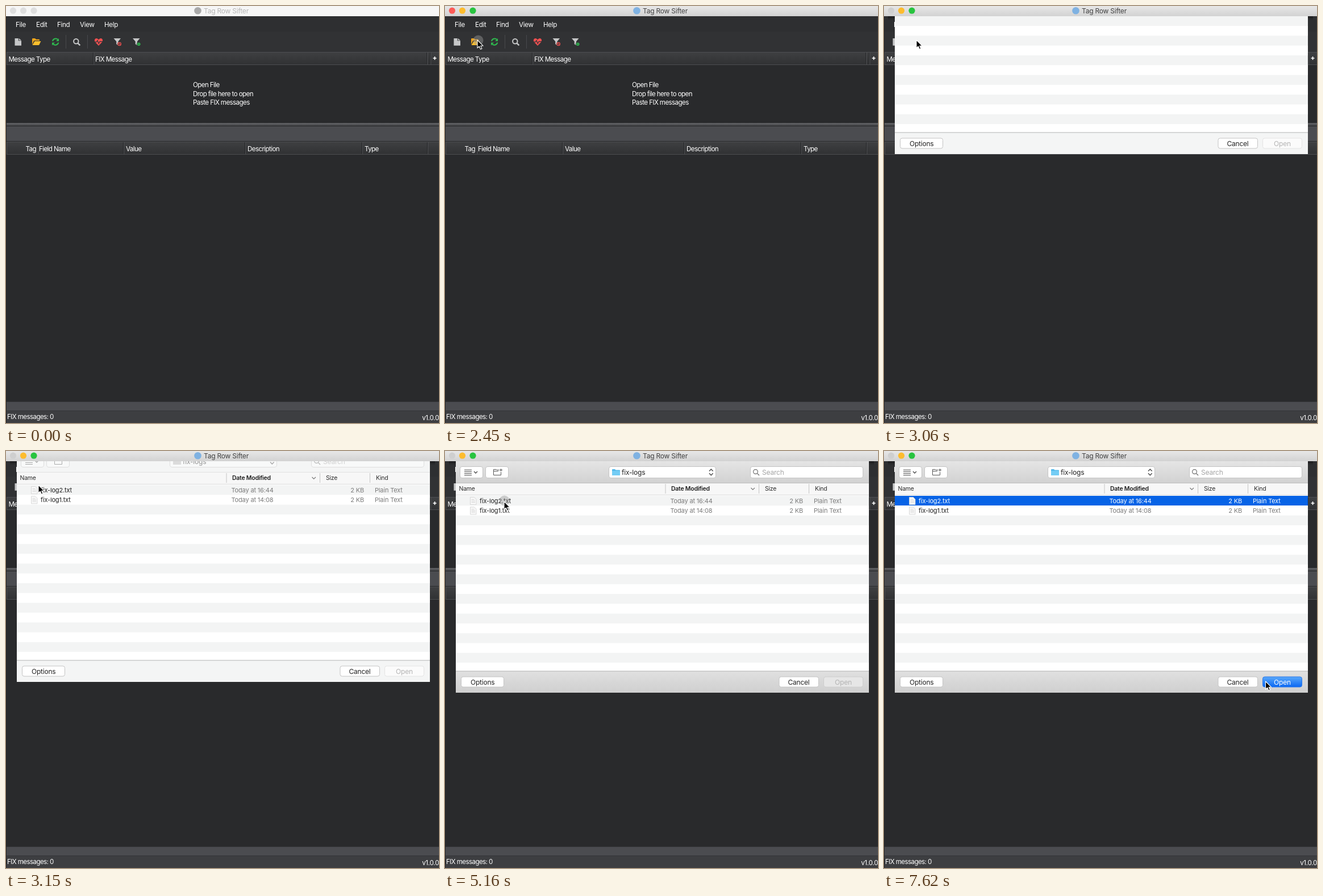
These frames come from a looping animation (762 by 735 pixels, 8 s). An HTML page:

```html
<!DOCTYPE html>
<html lang="en">
<head>
<meta charset="utf-8">
<title>Log window</title>
<style>
html, body { margin: 0; width: 100%; height: 100%; overflow: hidden; background: #292a2c; }
svg { display: block; width: 762px; height: 735px; }
text { font-family: Inter, Roboto, sans-serif; white-space: pre; }
.app { font-size: 11.6px; letter-spacing: -.6px; fill: #fff; }
.menu { font-size: 11.6px; letter-spacing: -.3px; fill: #fff; }
.title { font-size: 12px; letter-spacing: -.22px; }
.ui { font-size: 12px; letter-spacing: -.2px; fill: #222; }
.cell { font-size: 11px; letter-spacing: -.16px; }
.head { font-size: 10.5px; letter-spacing: -.25px; fill: #2b2b2b; }
.bold { font-weight: 600; fill: #1c1c1c; }
.end { text-anchor: end; }
.mid { text-anchor: middle; }
</style>
</head>
<body>
<svg id="stage" viewBox="0 0 762 735" xmlns="http://www.w3.org/2000/svg"></svg>
<script>
const LOOP = 8000;
const stage = document.getElementById('stage');

const rect = (x, y, w, h, fill, more = '') =>
  `<rect x="${x}" y="${y}" width="${w}" height="${h}" fill="${fill}" ${more}/>`;
const text = (x, y, s, cls, more = '') => `<text x="${x}" y="${y}" class="${cls}" ${more}>${s}</text>`;
const path = (d, fill, more = '') => `<path d="${d}" fill="${fill}" ${more}/>`;
const line = (d, color, w = 1, more = '') =>
  path(d, 'none', `stroke="${color}" stroke-width="${w}" ${more}`);
const dot = (x, y, r, fill, more = '') => `<circle cx="${x}" cy="${y}" r="${r}" fill="${fill}" ${more}/>`;
const group = (id, body, more = '') => `<g id="${id}" ${more}>${body}</g>`;
const grad = (id, a, b) => `<linearGradient id="${id}" x2="0" y2="1">
  <stop stop-color="${a}"/><stop offset="1" stop-color="${b}"/></linearGradient>`;

const defs = `<defs>
  ${grad('gTitle', '#e7e7e7', '#d2d2d2')}
  ${grad('gHead', '#3f4042', '#303133')}
  ${grad('gTop', '#e5e5e5', '#d1d1d1')}
  ${grad('gFoot', '#e0e0e0', '#cfcfcf')}
  ${grad('gBlue', '#5aa9fb', '#0a67f3')}
  ${grad('gSplit', '#66676a', '#47484b')}
  ${grad('gShade', '#000', 'rgba(0,0,0,0)')}
  <clipPath id="below">${rect(0, 18, 762, 717, '#000')}</clipPath>
</defs>`;

function tableHead(y, seps) {
  return rect(1, y, 761, 23, 'url(#gHead)') +
    line(`M1 ${y + .5}H762M1 ${y + 22.5}H762M1.5 ${y}V${y + 23}`, '#4d4e51') +
    seps.map(x => line(`M${x - .5} ${y + 1}V${y + 22}`, '#222325') +
      line(`M${x + .5} ${y + 1}V${y + 22}`, '#515255')).join('');
}

function toolbar() {
  const gray = '#c6c7c8', red = '#f05050', green = '#2fbb4f';
  const funnel = x => path(`M${x} 57h12.5l-4.6 5.4v7l-3.2-2.4v-4.6z`, gray);
  return path('M15.5 57h6.3v4.2H27V69.8H15.5z', gray) + path('M22.8 57l4.2 3.4h-4.2z', gray) +
    path('M46 68V58.2q0-1.2 1.2-1.2h4l1.6 1.7h5q1.2 0 1.2 1.2v1.1H50.4q-1.2 0-1.8 1.2z', '#f0a51c') +
    path('M50.6 62H61.4l-2.8 6q-.4.9-1.4.9H46.4z', '#fdbf2d') +
    line('M82 62a5.4 5.2 0 0 1 9.4-2.6M92.2 64.4a5.4 5.2 0 0 1-9.4 2.6', green, 2) +
    path('M93 57v5h-5zM81 69.6v-5h5z', green) +
    line('M105.5 51V75M143.5 51V75', '#48494c') +
    dot(123.3, 62.3, 4.2, 'none', `stroke="${gray}" stroke-width="2"`) +
    line('M126.5 65.6L130.3 69.4', gray, 2.4) +
    path('M163 70L157 63.8C154 60 157.5 55.3 161.300 57.700L163 59.200L164.700 57.700C168.500 55.300 172 60 169 63.800Z', red) +
    line('M155.500 63.300H159.500L161 60.700L163.200 66.200L165 62.700H170.500', '#33363a', 1.2) +
    funnel(189.5) + dot(199.700, 67, 3.600, '#303133') +
    dot(199.700, 67, 2.700, 'none', `stroke="${red}" stroke-width="1.2"`) + line('M198 65.300L201.400 68.700', red, 1.1) +
    funnel(223) + dot(233.700, 67.200, 3.600, '#303133') + dot(233.700, 67.200, 2.800, green) +
    dot(233.700, 67.200, .9, '#303133');
}

function appWindow() {
  const menus = [[17, 'File'], [53, 'Edit'], [90, 'Find'], [130, 'View'], [173, 'Help']];
  const cols = [[58, 'Field Name'], [211, 'Value'], [425, 'Description'], [631, 'Type']];
  const hints = ['Open File', 'Drop file here to open', 'Paste FIX messages'];
  return rect(0, 0, 762, 735, '#292a2c') +
    rect(0, 18, 762, 27, '#2e2f31') + rect(0, 45, 762, 36, '#313234') +
    menus.map(([x, s]) => text(x, 36.5, s, 'menu')).join('') + toolbar() +
    tableHead(81, [154, 741, 747]) +
    text(4.5, 97.5, 'Message Type', 'app') + text(157, 97.5, 'FIX Message', 'app') +
    line('M751.500 92H757.500M754.500 89V95', '#fff', 1.6) +
    hints.map((s, i) => text(329, 143 + i * 15.5, s, 'app')).join('') +
    rect(0, 205, 762, 6, 'url(#gSplit)') + line('M0 205.500H762M0 211.500H762', '#212224') +
    rect(1, 212, 761, 26, '#4b4c50') + line('M0 238.500H762', '#242527') +
    tableHead(239, [56, 207, 421, 627, 742]) +
    text(53, 255.500, 'Tag', 'app end') +
    cols.map(([x, s]) => text(x, 255.500, s, 'app')).join('') +
    rect(0, 697, 762, 16, '#4b4c50') + line('M0 697.500H762M0 713.500H762', '#333437') +
    rect(0, 714, 762, 21, '#3d3e41') +
    text(2, 728, 'FIX messages: 0', 'app') +
    text(762, 729.500, 'v1.0.0', 'menu end') +
    line('M.5 18V735', '#202123');
}

function titleBar() {
  return rect(0, 0, 762, 18, '#f6f6f6', 'id="bar"') +
    [12.5, 30.5, 49].map((x, i) => dot(x, 8.2, 5.600, '#dedede', `id="light${i}"`)).join('') +
    dot(337.5, 8.300, 6.300, '#a9a9a9', 'id="mark"') +
    text(348, 12.800, 'Tag Row Sifter', 'title', 'id="name"');
}

const button = (x, y, w, h, more = '') =>
  rect(x + .5, y + .5, w - 1, h - 1, '#fff', `rx="3.500" stroke="#c4c4c4" ${more}`);

function fileRow(i, name, time) {
  const y = 92 + i * 17.3, top = y - 10.5;
  return path(`M44.500 ${top}h7l3.500 3.500v9.500h-10.500z`, '#f7f7f7', 'stroke="#d2d2d2" stroke-width=".8"') +
    line(`M46.500 ${top + 4}h5M46.500 ${top + 6.500}h6.500M46.500 ${top + 9}h6.500`, '#cfcfcf', .8) +
    `<g id="row${i}">` + text(61, y, name, 'cell', 'fill="#222"') + text(396.500, y, time, 'cell') +
    text(630, y, '2 KB', 'cell end') + text(649, y, 'Plain Text', 'cell') + '</g>';
}

function controls() {
  return button(26, 27, 41, 21) + button(71, 27, 41, 21) + button(288, 27, 189, 21) + button(537, 27, 199, 21) +
    line('M34 33.500H47M34 36.500H47M34 39.500H47M34 42.500H47', '#4a4a4a') +
    line('M51 36L54 39L57 36', '#4a4a4a', 1.300) +
    line('M95 33.500H91.500L90 32.500H85.500V42.500H98.500V37M85.500 35.500H94M98.500 31V36M96 33.500H101', '#555') +
    path('M294 33q0-1 1-1h4l1.500 1.500h6.500q1 0 1 1V42q0 1-1 1H295q-1 0-1-1z', '#54b9ea') +
    rect(294, 35, 14, 8, '#74cdf5', 'rx="1"') +
    text(311, 41.700, 'fix-logs', 'ui') +
    group('arrows', line('M465 35.500L468.300 32L471.600 35.500M465 39.300L468.300 42.800L471.600 39.300', '#4a4a4a', 1.400)) +
    group('arrow', line('M465 38.500L468.300 42L471.600 38.500', '#4a4a4a', 1.400)) +
    dot(546.500, 36.500, 3.900, 'none', 'stroke="#6d6d6d" stroke-width="1.200"') +
    line('M549.400 39.400L553 43', '#6d6d6d', 1.300) +
    text(558, 41.700, 'Search', 'ui', 'style="fill:#a5a5a5"');
}

function sheet() {
  let stripes = '';
  for (let i = 0; i < 18; i += 2) stripes += rect(19, (79 + i * 17.3).toFixed(1), 727, 17.3, '#f3f4f4');
  return rect(19, 18, 727, 408, '#fff') +
    rect(19, 18, 727, 39, '#f4f5f5', 'id="top"') + group('controls', controls()) +
    rect(19, 57, 727, 21, '#f7f7f7') + line('M19 56.500H746', '#c9c9c9', 1, 'id="rule"') +
    line('M19 77.500H746', '#dcdcdc') +
    line('M388 58V75M552.500 58V75M640.500 58V75', '#c4c4c4') +
    text(24.500, 70.300, 'Name', 'head') + text(398, 70.300, 'Date Modified', 'head bold') +
    text(563, 70.300, 'Size', 'head') + text(651, 70.300, 'Kind', 'head') +
    line('M538.500 65L541.700 68.200L545 65', '#777', 1.100) +
    stripes + rect(19, 79, 727, 17, '#0763e6', 'id="pick"') +
    fileRow(0, 'fix-log2.txt', 'Today at 16:44') + fileRow(1, 'fix-log1.txt', 'Today at 14:08') +
    rect(19, 388, 727, 38, '#f4f5f5', 'id="foot"') + line('M19 388H746', '#b2b2b2') +
    button(28, 397.500, 76, 19) + button(587.500, 397.500, 70.500, 19) +
    button(666, 397.500, 70, 19, 'id="ok"') +
    text(66.200, 411.500, 'Options', 'ui mid') + text(622.500, 411.500, 'Cancel', 'ui mid') +
    text(701, 411.500, 'Open', 'ui mid', 'id="okText"');
}

const arrowPath = 'M0 0V14L3.200 11.100L5.500 16.200L7.900 15.200L5.700 10.200H10Z';
stage.innerHTML = defs + appWindow() +
  group('shade', rect(7, 18, 748, 7, 'url(#gShade)', 'opacity=".4"')) +
  `<g clip-path="url(#below)">${group('sheet', sheet())}</g>` + titleBar() +
  group('ring', dot(0, 0, 9, '#9a9a9a', 'fill-opacity=".45"')) +
  group('cursor', path(arrowPath, '#000', 'stroke="#fff" stroke-width="1.100" stroke-linejoin="round"'));

const el = id => document.getElementById(id);
const set = (id, key, value) => el(id).setAttribute(key, value);
const show = (id, on) => set(id, 'display', on ? 'inline' : 'none');

// Pointer strokes: start and end time, steps, lead-in, start, bend, end
const strokes = [
  [360, 1090, 9, 0, [-4, 222], [28, 110], [57, 80]],
  [1180, 1520, 5, .6, [57, 80], [34, 48], [57, 60]],
  [4250, 4800, 7, .6, [57, 60], [78, 76], [104, 89]],
  [6230, 7010, 10, .4, [104, 89], [360, 226], [610, 368]],
  [7100, 7620, 7, .4, [610, 368], [638, 391], [671.5, 406]]
];
const smooth = p => p * p * (3 - 2 * p);

function pointer(t) {
  const s = strokes.filter(s => t >= s[0]).pop();
  if (!s) return null;
  const [t0, t1, n, lead, a, b, c] = s;
  const k = Math.min(n - 1, Math.floor((t - t0) / (t1 - t0) * (n - 1) + .02));
  const p = smooth((k + lead) / (n - 1 + lead)), q = 1 - p;
  return a.map((v, i) => q * q * v + 2 * p * q * b[i] + p * p * c[i]);
}

function sheetShift(t) {
  const steps = [[3320, 0], [3150, -19], [3060, -165], [2980, -338], [2890, -402]];
  return steps.find(s => t >= s[0])[1];
}

function draw(t) {
  const active = t >= 2450, open = t >= 2890, ready = t >= 3320, picked = t >= 5330;
  set('bar', 'fill', active ? 'url(#gTitle)' : '#f6f6f6');
  set('name', 'fill', active ? '#414141' : '#b5b5b5');
  set('mark', 'fill', active ? '#7fb2e2' : '#a9a9a9');
  set('light0', 'fill', active ? (open ? '#cfcfcf' : '#fc5b57') : '#dedede');
  set('light1', 'fill', active ? '#fdbc2e' : '#dedede');
  set('light2', 'fill', active ? '#28c43f' : '#dedede');

  show('sheet', open);
  show('shade', open);
  if (open) set('sheet', 'transform', `translate(0 ${sheetShift(t)})`);
  set('top', 'fill', ready ? 'url(#gTop)' : '#f4f5f5');
  set('foot', 'fill', ready ? 'url(#gFoot)' : '#f4f5f5');
  set('rule', 'stroke', ready ? '#bdbdbd' : '#e2e2e2');
  set('controls', 'opacity', ready ? 1 : .45);
  set('controls', 'style', ready ? '' : 'filter:grayscale(1)');
  show('arrows', ready);
  show('arrow', !ready);

  show('pick', picked);
  set('row0', 'fill', picked ? '#fff' : '#7b7b7b');
  set('row1', 'fill', '#7b7b7b');
  el('row0').firstChild.setAttribute('fill', picked ? '#fff' : '#222');
  set('ok', 'fill', picked ? 'url(#gBlue)' : ready ? '#e6e6e6' : '#fbfbfb');
  set('ok', 'stroke', picked ? '#2a77e8' : ready ? '#cdcdcd' : '#e4e4e4');
  el('okText').style.fill = picked ? '#fff' : '#b3b3b3';

  const at = pointer(t);
  show('cursor', at);
  if (at) set('cursor', 'transform', `translate(${at[0].toFixed(1)} ${at[1].toFixed(1)})`);
  const first = t >= 2450 && t < 2620, second = t >= 5160 && t < 5330;
  show('ring', first || second);
  set('ring', 'transform', first ? 'translate(58.5 60.5)' : 'translate(104.5 87.5)');
}

const begin = performance.now();
function tick() {
  draw((performance.now() - begin) % LOOP);
  requestAnimationFrame(tick);
}
tick();
</script>
</body>
</html>
```
